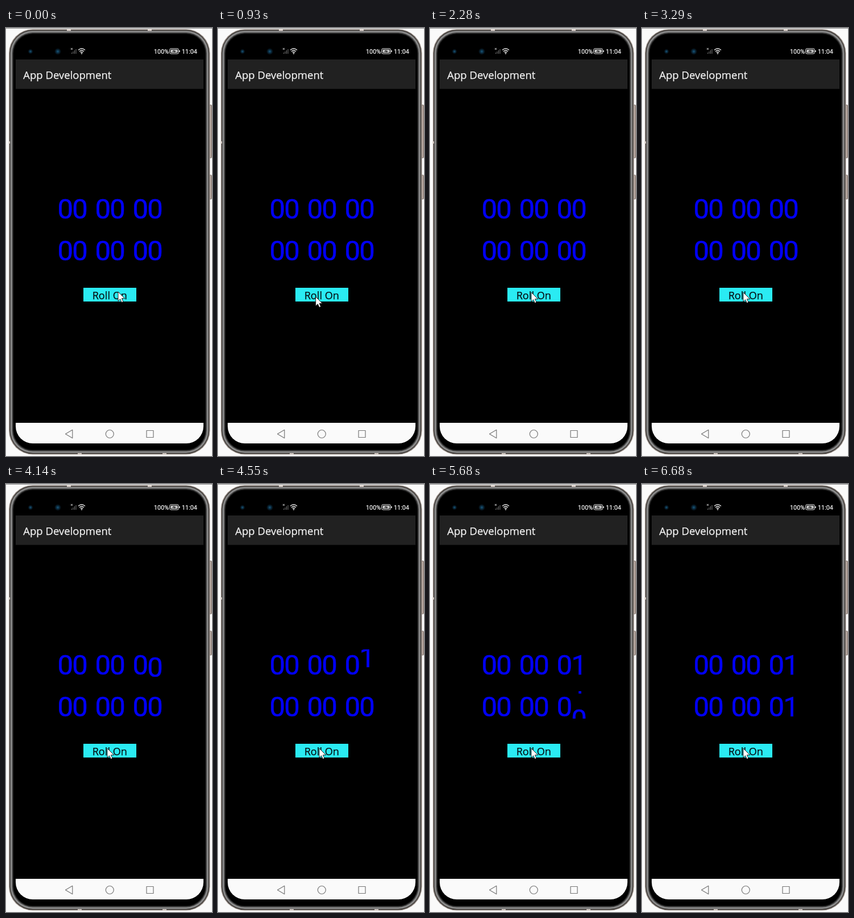
Animation, 362 px wide and 748 px high, one loop 8000 ms. Source, as an HTML page:

```html
<!DOCTYPE html>
<html lang="en">
<head>
<meta charset="utf-8">
<title>Rolling counter</title>
<style>
  html, body { margin: 0; width: 100%; height: 100%; overflow: hidden; background: #fafafa; }
  svg { display: block; width: 362px; height: 748px; }
  .label { font-family: "Open Sans", "Noto Sans", sans-serif; stroke-width: .25; }
  .status { font: 10.8px Roboto, sans-serif; fill: #fff; stroke: #fff; stroke-width: .15; }
  .digits { font: 49px Roboto, sans-serif; fill: #0000f5; stroke: #0000f5; stroke-width: .5; text-anchor: middle; }
  .nav { fill: none; stroke: #777; stroke-width: 1.2; stroke-linejoin: round; }
</style>
</head>
<body>
<svg viewBox="0 0 362 748">
  <defs>
    <radialGradient id="lens">
      <stop offset="0" stop-color="#195a80"/>
      <stop offset=".5" stop-color="#0a2638"/>
      <stop offset="1" stop-color="#000"/>
    </radialGradient>
    <clipPath id="clip0"><rect x="85" y="289" width="196" height="48"/></clipPath>
    <clipPath id="clip1"><rect x="85" y="362" width="196" height="48"/></clipPath>
  </defs>

  <!-- phone body -->
  <rect width="362" height="748" fill="#fafafa"/>
  <rect width="362" height="1" fill="#8c8c8c"/>
  <g fill="#b3a39b" stroke="#6f625c" stroke-width=".8">
    <rect x="356" y="134.500" width="5.500" height="92.500" rx="1.500"/>
    <rect x="356" y="257" width="5.500" height="42" rx="1.500"/>
  </g>
  <g id="bezel"></g>
  <g fill="#d8cec8">
    <rect x="107" y="2" width="7" height="3"/>
    <rect x="249" y="2" width="7" height="3"/>
    <rect x="126" y="743" width="7" height="2.500"/>
    <rect x="275" y="743" width="7" height="2.500"/>
    <rect x="4.500" y="198" width="2.500" height="4"/>
  </g>

  <!-- status bar -->
  <circle cx="43" cy="41" r="4.500" fill="url(#lens)"/>
  <circle cx="91" cy="41" r="6" fill="url(#lens)"/>
  <g fill="none" stroke="#eee" stroke-width="1">
    <path d="M114 35l3 3M117 35l-3 3"/>
    <path d="M115.500 45v-2M118 45v-4M120.500 45v-6M123 45v-8" stroke="#777"/>
    <path d="M127 38.500q6-5 12 0M129 41q4-3.500 8 0M131 43.200q2-1.800 4 0" stroke-width="1.300"/>
    <rect x="287.500" y="36" width="16" height="9" rx="2.500"/>
    <path d="M305 39v3" stroke-width="1.400"/>
  </g>
  <circle cx="133" cy="44.800" r="1" fill="#eee"/>
  <rect x="289.200" y="37.700" width="12.600" height="5.600" rx="1.200" fill="#ccc"/>
  <path d="M291 41.200l5-2.700v1.500h4l-5 2.600v-1.400z" fill="#222"/>
  <text class="status" x="260" y="44.500">100%</text>
  <text class="status" x="309" y="44.500">11:04</text>

  <!-- app -->
  <rect x="17" y="55" width="330" height="51.500" fill="#212121"/>
  <text class="label" x="30.300" y="88.500" font-size="18.500" fill="#f4f4f4" stroke="#f4f4f4">App Development</text>
  <g class="digits" id="digits"></g>
  <rect x="136" y="454" width="93" height="24" fill="#2aebf3"/>
  <text class="label" x="151.700" y="474" font-size="18.100" fill="#061216" stroke="#061216">Roll On</text>

  <!-- navigation -->
  <path d="M17 690H347V696A30 30 0 0 1 317 726H47A30 30 0 0 1 17 696Z" fill="#fafafa"/>
  <g class="nav">
    <path d="M104.500 709.500L116.800 702.300V716.700Z"/>
    <circle cx="182.300" cy="709.500" r="7"/>
    <rect x="247" y="703.500" width="12" height="12"/>
  </g>

  <path id="cursor" d="M0 0V16.200L3.700 12.800L6.300 18.600L9 17.400L6.500 11.700H11.600Z"
        fill="#fff" stroke="#111" stroke-width=".9" stroke-linejoin="round"/>
</svg>
<script>
const LOOP = 8000, GAP = 62, BASE = [333, 405.7];
const ROW_START = 4060, DROP_START = 4808, ROLL_START = 5222;

// key points of the pointer tip: time, x, y
const pointer = [
  [690, 197, 461], [1050, 159, 474], [1170, 177, 446], [1410, 167, 458], [1530, 177, 483],
  [1650, 191, 436], [1770, 162, 466], [1890, 183, 490], [2250, 178, 462]
];

const $ = id => document.getElementById(id);
const clamp = v => Math.min(1, Math.max(0, v));
// holds the time between screen updates
const hold = (t, start, step) => start + Math.floor((t - start) / step) * step;

function add(parent, name, attrs, text = "") {
  const el = document.createElementNS("http://www.w3.org/2000/svg", name);
  for (const key in attrs) el.setAttribute(key, attrs[key]);
  el.textContent = text;
  return parent.appendChild(el);
}

// metal rim: nested rounded frames from the edge inwards
["#a69c96", "#3c3835", "#686766", "#979797", "#767676", "#414141", "#181818", "#000"].forEach((fill, i) => {
  const d = i * 1.2;
  add($("bezel"), "rect", { x: 5 + d, y: 2 + d, width: 353.5 - 2 * d, height: 743.5 - 2 * d, rx: 42 - d, fill });
});

const rows = BASE.map((y, i) => {
  const g = add($("digits"), "g", { "clip-path": `url(#clip${i})` });
  const digit = (n, char) => add(g, "text", { x: 104.3 + 66 * (n >> 1) + 25.7 * (n % 2), y }, char);
  for (let n = 0; n < 5; n++) digit(n, "0");
  return { zero: digit(5, "0"), one: digit(5, "1") };
});

function pointerAt(t) {
  const i = pointer.findIndex(key => key[0] > t);
  if (i < 0) return pointer.at(-1).slice(1);
  if (i === 0) return pointer[0].slice(1);
  const [t0, x0, y0] = pointer[i - 1], [t1, x1, y1] = pointer[i];
  const p = (t - t0) / (t1 - t0);
  return [x0 + (x1 - x0) * p, y0 + (y1 - y0) * p];
}

function roll(t, start, length) {
  const p = clamp((t - start) / length) ** 0.75;
  return GAP * p * p * (3 - 2 * p);
}

function setRow(i, shift, showOne) {
  const { zero, one } = rows[i];
  zero.setAttribute("y", BASE[i] + shift);
  one.setAttribute("y", BASE[i] + shift - GAP);
  one.setAttribute("visibility", showOne ? "visible" : "hidden");
}

function draw() {
  const now = performance.now() % LOOP;
  const [x, y] = pointerAt(now < 810 ? 0 : hold(now, 810, 120));
  $("cursor").setAttribute("transform", `translate(${x} ${y})`);

  const t = hold(now, 3290, 138);
  const rolling = t >= ROLL_START;
  setRow(0, roll(t, ROW_START, 748), true);
  setRow(1, rolling ? roll(t, ROLL_START, 1370) : roll(t, DROP_START, 560), rolling);
  requestAnimationFrame(draw);
}
draw();
</script>
</body>
</html>
```
